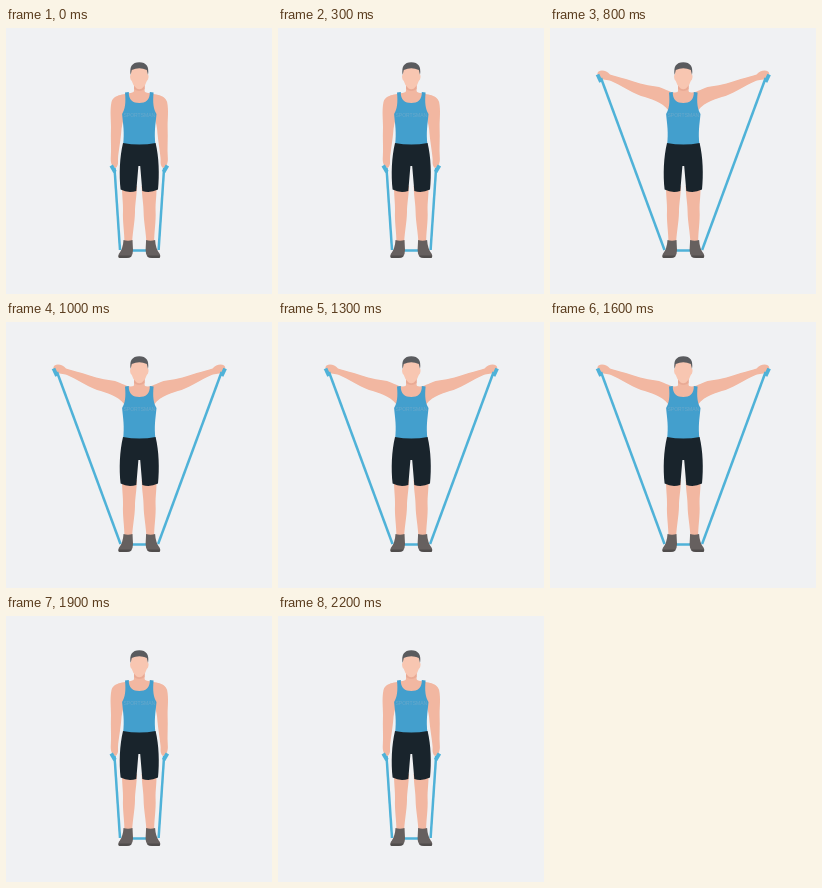
Write an HTML page that moves like this. It is 266 px wide and 266 px high and loops after 2.3 s.

```html
<!DOCTYPE html>
<html lang="en">
<head>
<meta charset="utf-8">
<title>Resistance band lateral raise</title>
<style>
  html, body { margin: 0; width: 100%; height: 100%; overflow: hidden; background: #f0f1f3; }
  svg { display: block; width: 100%; height: 100%; }
  .skin { fill: #f2b7a1; }
  .face { fill: #f8c6b1; }
  .shade { fill: #e9aa95; }
  .band { fill: none; stroke: #4fb2d8; stroke-width: 2.5; }
  .grip { stroke-width: 3.8; }
  text { font: 5px "Liberation Sans", Arial, sans-serif; fill: #6aa9cb; text-anchor: middle; }
</style>
</head>
<body>
<svg viewBox="0 0 266 266">
  <defs>
    <!-- Left half of each symmetric part; the right half is mirrored -->
    <g id="leg">
      <path class="skin" d="M116 158H131C130.500 170 129 176 129 184C128.800 195 126.500 204 126 217H118.500C118.500 203 116.500 194 117 183C117.200 174 116 169 116 158Z"/>
      <path fill="#66605f" d="M117.500 212Q122 213.500 126.500 212L127 222Q127 230 120 230H114Q111.500 230 112.800 226Q117 221 117.500 212Z"/>
      <path fill="#504d4c" d="M112.500 227.500H126Q125 230 120 230H114Q112.200 230 112.500 227.500Z"/>
    </g>
    <g id="down">
      <path class="band" d="M108.500 140L114 222"/>
      <path class="skin" d="M128 64C119 67 108 65.500 105.500 74C103.800 82 105 91 105 99C104.500 111 105.500 121 104.800 129C104.300 135 106 139 109.500 140Q112.500 139 112 131C112.500 123 114.800 112 115.500 101C116.500 94 118 90 119 84L126 82Z"/>
      <path class="band grip" d="M105.200 137.500L109 144"/>
    </g>
    <g id="up">
      <path class="skin" d="M128 64C120 66 116 60 106 58.500C95 57.500 85 54 76 51C69 49 64 48 60 46.500C57 43 52 41.500 48.500 43.500Q46 46 49 49.500C53 52.500 57 51.500 61 53C71 57 80 64 91 68C101 71 111 73 119 83L126 84Z"/>
      <path class="band" d="M51 50L114.500 222"/>
      <path class="band grip" d="M47.500 46.500L51 54"/>
    </g>
  </defs>

  <path class="band" d="M124 222.500H143"/>
  <use href="#leg"/>
  <use href="#leg" transform="matrix(-1 0 0 1 266.600 0)"/>
  <g class="pose"><use href="#down"/><use href="#down" transform="matrix(-1 0 0 1 266.600 0)"/></g>
  <g class="pose"><use href="#up"/><use href="#up" transform="matrix(-1 0 0 1 266.600 0)"/></g>

  <path class="skin" d="M128 54H138.600V63Q139 66 147 67L145 82H121L119.500 67Q127.500 66 128 63Z"/>
  <path class="shade" d="M128 56H138.600V61Q133.300 65 128 61Z"/>
  <path class="face" d="M125 42Q133 36 141.600 42V46.500Q143.300 47 142 51.500L140.800 53Q139.500 58 136 60.500Q133.300 62 130.600 60.500Q127 58 125.800 53L124.600 51.500Q123.300 47 125 46.500Z"/>
  <path fill="#5a5b5e" d="M124.600 47Q122.500 34.500 133.300 34.300Q144 34.500 142 47L140.800 42Q133.300 38.500 125.800 42Z"/>

  <path fill="#439fcd" d="M119 64.500L122.800 64C122.500 72 127 75 133.300 75S144.100 72 143.800 64L147.600 64.500C146.600 75 147.500 81 150.500 86C149.500 97 148 104 149.500 117H117.100C118.600 104 117.100 97 116.100 86C119.100 81 120 75 119 64.500Z"/>
  <text x="133.300" y="89">SPORTSMAN</text>
  <path fill="#19242c" d="M117 115Q133.300 118 149.600 115C153 129 153.500 147 152 161.500Q144 165.500 136.300 163L134.200 138H132.400L130.300 163Q122 165.500 114.600 161.500C113 147 113.600 129 117 115Z"/>
</svg>
<script>
  const LOOP = 2300, RAISE = 400, LOWER = 1900;
  const [down, up] = document.querySelectorAll('.pose');

  function draw(now) {
    const t = now % LOOP;
    const raised = t >= RAISE && t < LOWER;
    down.style.display = raised ? 'none' : '';
    up.style.display = raised ? '' : 'none';
    requestAnimationFrame(() => draw(performance.now()));
  }
  draw(0);
</script>
</body>
</html>
```
